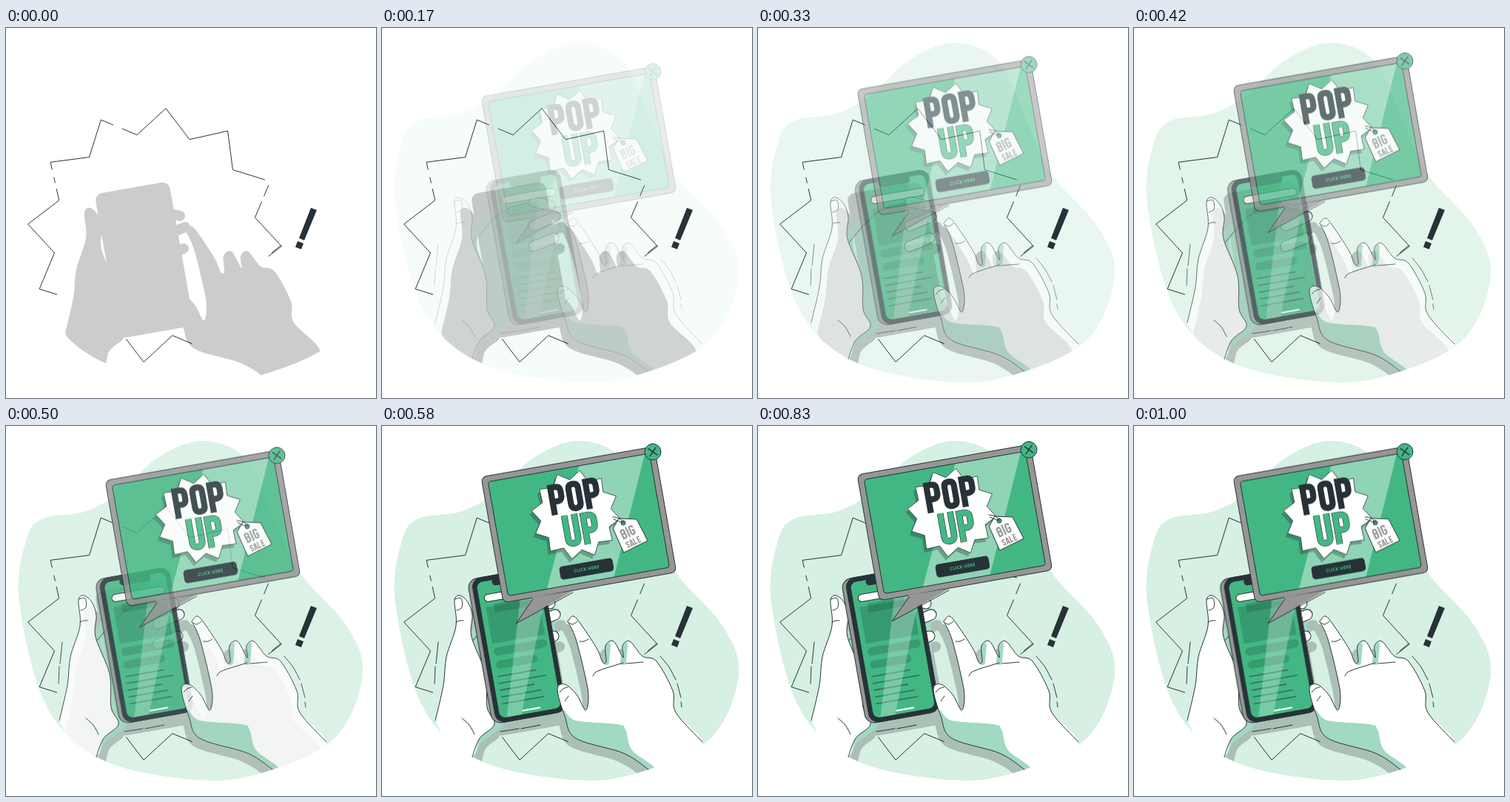
Recreate the animation shown at these times as an HTML page with a canvas. Size 500 px wide and 500 px high, loop 1.04 s.

```html
<!DOCTYPE html>
<html lang="en">
<head>
<meta charset="utf-8">
<title>Pop up</title>
<style>
html, body { margin: 0; width: 100%; height: 100%; overflow: hidden; background: #fff; }
canvas { display: block; width: 500px; height: 500px; }
</style>
</head>
<body>
<canvas id="stage"></canvas>
<script>
const DARK = '#263238', GREEN = '#43b783', MINT = '#d6f0e3', SHADE = '#a2d9c2', GRAY = '#969696';
const DEG = Math.PI / 180, TILT = -10 * DEG;
const LOOP = 1040, TICK = 1000 / 24;
const ratio = window.devicePixelRatio || 1;

function prepare(canvas) {
  canvas.width = canvas.height = 500 * ratio;
  const c = canvas.getContext('2d');
  c.scale(ratio, ratio);
  c.lineJoin = c.lineCap = 'round';
  return c;
}

function layer(draw) {
  const canvas = document.createElement('canvas');
  draw(prepare(canvas));
  return canvas;
}

// Paths through flat x,y lists: straight or smooth.
function poly(p, closed) {
  const path = new Path2D();
  for (let i = 0; i < p.length; i += 2) path.lineTo(p[i], p[i + 1]);
  if (closed) path.closePath();
  return path;
}

function curve(p, closed) {
  const n = p.length / 2, path = new Path2D();
  const at = i => {
    i = closed ? (i + n) % n : Math.max(0, Math.min(n - 1, i));
    return [p[2 * i], p[2 * i + 1]];
  };
  path.moveTo(p[0], p[1]);
  for (let i = 0; i < (closed ? n : n - 1); i++) {
    const [a, b, d, e] = [at(i - 1), at(i), at(i + 1), at(i + 2)];
    path.bezierCurveTo(b[0] + (d[0] - a[0]) / 6, b[1] + (d[1] - a[1]) / 6,
      d[0] - (e[0] - b[0]) / 6, d[1] - (e[1] - b[1]) / 6, d[0], d[1]);
  }
  return path;
}

function box(x, y, w, h, r = 0) {
  const path = new Path2D();
  path.roundRect(x, y, w, h, r);
  return path;
}

// Twelve-pointed star, walked anticlockwise from the point at 5 degrees.
function star(x, y, radius) {
  const p = [];
  for (let i = 0; i < 24; i++) {
    const a = (5 - 15 * i) * DEG, r = i % 2 ? radius * 0.8 : radius;
    p.push(x + r * Math.cos(a), y + r * Math.sin(a));
  }
  return poly(p, true);
}

function paint(c, path, fill, stroke, width = 1) {
  if (fill) { c.fillStyle = fill; c.fill(path); }
  if (stroke) { c.strokeStyle = stroke; c.lineWidth = width; c.stroke(path); }
}

const ink = (c, ...lists) => lists.forEach(p => paint(c, curve(p), null, DARK));

function moved(c, x, y, angle, draw) {
  c.save();
  c.translate(x, y);
  c.rotate(angle);
  draw();
  c.restore();
}

function clipped(c, path, draw) {
  c.save();
  c.clip(path);
  draw();
  c.restore();
}

// Condensed display lettering on a 22 x 42 cell.
const LETTERS = {
  P: 'M4.5 42V4.5H11Q17.5 4.5 17.5 11V17Q17.5 24 11 24H4.5',
  O: 'M4.5 11Q4.5 4.5 11 4.5T17.5 11V31Q17.5 37.5 11 37.5T4.5 31Z',
  U: 'M4.5 0V31Q4.5 37.5 11 37.5T17.5 31V0',
  B: 'M4.5 4.5H11Q17.5 4.5 17.5 11V14Q17.5 20 11 20H4.5M11 20Q17.5 21 17.5 27V31Q17.5 37.5 11 37.5H4.5V4.5',
  I: 'M4.5 0V42',
  G: 'M17.5 13V11Q17.5 4.5 11 4.5T4.5 11V31Q4.5 37.5 11 37.5T17.5 31V22H11',
  S: 'M17.5 12V11Q17.5 4.5 11 4.5T4.5 11Q4.5 16 11 21T17.5 31Q17.5 37.5 11 37.5T4.5 31V29',
  A: 'M3 42L9 4H13L19 42M6 32H16',
  L: 'M4.5 0V37.5H18',
  E: 'M18 4.5H4.5V37.5H18M4.5 21H16'
};

function lettering(c, word, x, y, angle, size, color, width, edge) {
  moved(c, x, y, angle, () => {
    c.scale(size, size);
    c.lineCap = 'butt';
    c.lineJoin = 'miter';
    for (const ch of word) {
      const path = new Path2D(LETTERS[ch]);
      if (edge) paint(c, path, null, edge, width + 1.2);
      paint(c, path, null, color, width);
      c.translate(ch === 'I' ? 11 : 24, 0);
    }
  });
}

const blob = curve([
  18, 238, 27, 155, 50, 125, 105, 116, 150, 92, 208, 41, 268, 20, 326, 46, 365, 130,
  397, 198, 460, 270, 482, 336, 444, 422, 345, 469, 255, 478, 130, 451, 55, 379
], true);

const palm = [
  72, 398, 83, 350, 87, 312, 100, 270, 98, 236, 105, 229, 116, 238, 122, 256, 121, 285,
  140, 335, 142, 380, 152, 403, 132, 422, 122, 447
];
const fingers = [
  251, 264, 259, 257, 271, 271, 291, 302, 298, 319, 303, 318, 302, 297, 313, 291, 326, 313,
  325, 297, 335, 291, 352, 311, 371, 318, 393, 358, 397, 387, 433, 427
];
const thumb = [
  360, 464, 326, 442, 262, 422, 247, 392, 237, 356, 247, 349, 263, 363, 275, 384,
  279, 366, 275, 340, 262, 288, 251, 264
];
const leftShape = curve(palm.concat(90, 436));
const rightShape = curve(fingers.concat(404, 462, 368, 474, thumb));
const grips = [[206, 235, 227, 240], [205, 267, 234, 255], [205, 295, 232, 284]].map(p => poly(p));

const backdrop = layer(c => paint(c, blob, MINT));

const silhouette = layer(c => clipped(c, blob, () => {
  moved(c, 8, 14, 0, () => {
    paint(c, leftShape, '#000');
    grips.forEach(g => paint(c, g, null, '#000', 14));
  });
  moved(c, 124, 224, TILT, () => paint(c, box(-4.5, 0, 102, 198, 10), '#000'));
  moved(c, -8, 11, 0, () => paint(c, rightShape, '#000'));
}));

const base = layer(c => {
  // Dash lengths are counted in star edges and add up to one full round.
  const edge = 52.6;
  c.save();
  c.lineCap = 'butt';
  c.setLineDash([1.75, .15, .3, .25, 5.3, .25, 2.55, .2, .15, .15, 3.8, 2.8, 2.3, 4.05].map(n => n * edge));
  c.lineDashOffset = 0.3 * edge;
  paint(c, star(201, 280, 172), null, DARK);
  // The stretch just before the first vertex.
  c.setLineDash([]);
  paint(c, poly([371, 294, 359, 304]), null, DARK);
  c.restore();

  c.globalAlpha = 0.2;
  c.drawImage(silhouette, 0, 0, 500, 500);
  c.globalAlpha = 1;

  paint(c, poly([412, 243, 420, 246, 403, 287, 396, 284], true), DARK);
  paint(c, poly([394, 288, 402, 291, 399, 299, 391, 296], true), DARK);
});

const leftHand = layer(c => {
  paint(c, curve([121, 280, 165, 247, 222, 232, 230, 320, 165, 402, 136, 426, 122, 447, 142, 370], true), SHADE);
  ink(c, [121, 292, 165, 247, 222, 232]);
  for (const g of grips) {
    paint(c, g, null, DARK, 15);
    paint(c, g, null, '#fff', 13);
  }
  paint(c, leftShape, '#fff');
  ink(c, palm,
    [98, 234, 107, 233, 108, 245, 101, 249],
    [100, 265, 105, 263, 110, 263],
    [76, 292, 73, 321], [72, 325, 71, 348],
    [108, 395, 118, 404, 125, 417],
    [160, 413, 185, 409], [188, 409, 214, 404]);
});

const phone = layer(c => moved(c, 119.5, 207, TILT, () => {
  paint(c, box(-5.5, 0, 97, 198, 13), GRAY, DARK);
  paint(c, box(0, 0, 96, 198, 13), DARK, DARK);
  const screen = box(6, 6, 84, 186, 8);
  paint(c, screen, GREEN);
  paint(c, box(27, 4, 43, 10, 5), DARK);

  const dim = 'rgba(20, 70, 50, .24)';
  paint(c, box(24, 38, 50, 12), dim);
  paint(c, box(13, 41, 72, 50), dim);
  paint(c, box(13, 97, 73, 11, 5.5), dim);
  paint(c, box(13, 115, 57, 11, 5.5), dim);
  [52, 63, 46, 53, 56].forEach((w, i) =>
    paint(c, poly([13, 136 + i * 9.3, 13 + w, 136 + i * 9.3]), null, 'rgba(38, 50, 56, .5)', 1.8));

  clipped(c, screen, () =>
    paint(c, poly([70, 6, 90, 6, 90, 52, 35, 192, 15, 192], true), 'rgba(255, 255, 255, .28)'));
  paint(c, box(13, 24, 73, 10, 5), '#fff', DARK);
  paint(c, poly([38, 187, 61, 187]), null, '#fff', 2.4);
}));

const rightHand = layer(c => {
  paint(c, rightShape, '#fff');
  clipped(c, blob, () => clipped(c, rightShape, () => {
    paint(c, curve([244, 385, 262, 398, 318, 403, 329, 410, 338, 438, 370, 465, 345, 485, 240, 430], true), SHADE);
    for (const x of [303, 326]) paint(c, poly([x, 319, x + 2, 296]), null, SHADE, 8);
  }));
  ink(c, fingers, thumb,
    [253, 266, 258, 268, 264, 264],
    [267, 291, 273, 291, 279, 288],
    [240, 360, 245, 355, 251, 353], [247, 372, 252, 365],
    [285, 338, 292, 331, 326, 320], [330, 321, 353, 319],
    [376, 311, 388, 326, 397, 343], [399, 348, 404, 367], [404, 373, 405, 380]);
});

const popup = layer(c => {
  moved(c, 134, 68, TILT, () => {
    paint(c, box(0, 0, 237.5, 172.5, 7), GRAY, DARK);
    const screen = box(8, 8, 221.5, 156.5, 4);
    paint(c, screen, GREEN);
    clipped(c, screen, () =>
      paint(c, poly([133, 8, 223, 8, 153, 165, 61, 165], true), 'rgba(255, 255, 255, .4)'));
    paint(c, screen, null, DARK);
  });
  paint(c, poly([204, 230, 181, 266, 258, 222]), GRAY);
  paint(c, poly([204, 233, 181, 266, 258, 224]), null, DARK);

  paint(c, star(259, 124, 60), 'rgba(20, 50, 40, .32)');
  paint(c, star(262, 119, 60), '#fff', DARK, 0.8);
  lettering(c, 'POP', 222, 79, TILT, 1, DARK, 8.2);
  lettering(c, 'UP', 241.5, 121, TILT, 1.04, GREEN, 7.2, DARK);

  paint(c, poly([312, 138, 320, 124, 344, 125, 359, 154, 327, 170], true), '#fff', DARK);
  paint(c, box(323, 127, 6, 6, 3), GREEN, DARK);
  ink(c, [326, 130, 321, 124, 312, 122], [326, 130, 318, 127, 313, 125]);
  lettering(c, 'BIG', 320, 140, -0.44, 0.35, '#9a9a9a', 6.5);
  lettering(c, 'SALE', 328, 156, -0.44, 0.23, '#9a9a9a', 7);

  moved(c, 239.5, 190, TILT, () => {
    paint(c, box(0, 0, 72, 17, 4), DARK, DARK);
    const label = 'CLICK HERE', face = 'px "Open Sans", Roboto, sans-serif';
    c.fontStretch = 'extra-condensed';
    c.font = '700 9' + face;
    c.font = '700 ' + Math.min(9, 9 * 35 / c.measureText(label).width) + face;
    c.textAlign = 'center';
    c.textBaseline = 'middle';
    c.fillStyle = GREEN;
    c.fillText(label, 36, 9);
  });

  paint(c, box(355, 23, 22, 22, 11), GREEN, DARK);
  moved(c, 366, 34, TILT, () => {
    for (const s of [-5, 5]) paint(c, poly([-5, s, 5, -s]), null, DARK, 1.4);
  });
});

const stage = prepare(document.getElementById('stage'));

function put(image, alpha, x = 0, y = 0) {
  stage.globalAlpha = alpha;
  stage.drawImage(image, x, y, 500, 500);
}

function render(now) {
  const tick = Math.floor((now % LOOP + 5) / TICK);
  const fade = tick < 2 ? 0 : Math.min(1, (tick - 1.6) / 12.4);
  const sway = tick > 14 ? 1.5 * (1 - Math.cos(2 * Math.PI * (tick - 14) / 11)) : 0;
  const shift = 30 * (1 - fade) - sway + 0.9;

  stage.globalAlpha = 1;
  stage.fillStyle = '#fff';
  stage.fillRect(0, 0, 500, 500);
  put(backdrop, fade);
  put(base, 1);
  put(leftHand, fade);
  put(phone, fade, shift, 0);
  put(rightHand, fade);
  put(popup, fade, 0, shift);
}

let start;
function loop(now) {
  if (start === undefined) start = now;
  render(now - start);
  requestAnimationFrame(loop);
}
render(0);
requestAnimationFrame(loop);
</script>
</body>
</html>
```
